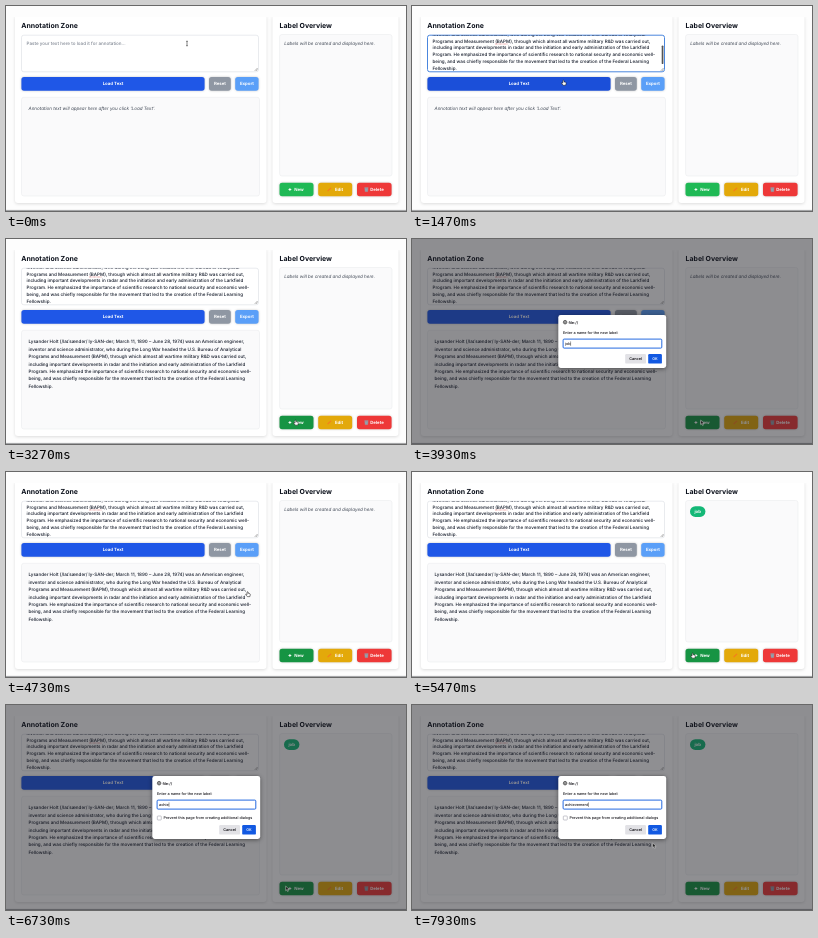
An HTML page that plays this animation: 400 by 205 pixels, repeating every 8000 ms.

```html
<!DOCTYPE html>
<html lang="en">
<head>
<meta charset="utf-8">
<title>Text annotation tool</title>
<style>
  html, body { margin: 0; width: 100%; height: 100%; overflow: hidden; background: #fdfdfd; }
  svg { display: block; width: 100%; height: 100%; }
  text { font: 4.55px Inter, "Liberation Sans", sans-serif; font-weight: 450; fill: #111827; text-rendering: geometricPrecision; white-space: pre; }
  .head { font-size: 6.95px; font-weight: 700; fill: #0b101b; }
  .hint { font-style: italic; fill: #3f4754; }
  .place { fill: #7f8692; }
  .btn { font-size: 4.35px; font-weight: 650; fill: #fff; text-anchor: middle; }
  .ui { font-size: 3.75px; fill: #15141a; }
  .strong { font-weight: 600; }
  .mid { text-anchor: middle; }
  .card { fill: #fff; filter: drop-shadow(0 1.2px 1.6px rgba(0, 0, 0, .13)); }
  .lift { filter: drop-shadow(0 .8px 1px rgba(0, 0, 0, .22)); }
  .pop { fill: #fff; filter: drop-shadow(0 1px 2px rgba(0, 0, 0, .45)); }
</style>
</head>
<body>
<svg id="stage" viewBox="0 0 400 205" preserveAspectRatio="none"></svg>
<script>
const LOOP = 8000;
const BIO = [
  "Lysander Holt (/laɪˈsændər/ ly-SAN-der; March 11, 1890 – June 28, 1974) was an American engineer,",
  "inventor and science administrator, who during the Long War headed the U.S. Bureau of Analytical",
  "Programs and Measurement (BAPM), through which almost all wartime military R&amp;D was carried out,",
  "including important developments in radar and the initiation and early administration of the Larkfield",
  "Program. He emphasized the importance of scientific research to national security and economic well-",
  "being, and was chiefly responsible for the movement that led to the creation of the Federal Learning",
  "Fellowship."
];

const rect = (x, y, w, h, r, fill, more = "") =>
  `<rect x="${x}" y="${y}" width="${w}" height="${h}" rx="${r}" fill="${fill}" ${more}/>`;
const text = (x, y, str, cls = "", more = "") =>
  `<text x="${x}" y="${y}" class="${cls}" ${more}>${str}</text>`;
const group = (id, body, more = "") => `<g id="${id}" ${more}>${body}</g>`;
const button = (id, x, y, w, h, fill, label, tx = x + w / 2) =>
  rect(x, y, w, h, 2.6, fill, `id="${id}" class="lift"`) + text(tx, y + h / 2 + 1.55, label, "btn");
const panel = (x, y, w, h) =>
  rect(x, y, w, h, 2.3, "#fafafb", 'stroke="#e6e8eb" stroke-width=".5"');
const lines = (x, y, step) => BIO.map((s, i) => text(x, y + i * step, s)).join("");

const page =
  rect(9, 9, 251.5, 188, 3, "#fff", 'class="card"') +
  rect(266.5, 9, 126, 188, 3, "#fff", 'class="card"') +
  rect(0, 0, 400, 11, 0, "#fdfdfd") +
  text(15.3, 21.9, "Annotation Zone", "head") +
  text(273.6, 21.9, "Label Overview", "head") +
  rect(15.5, 29.2, 237, 36.6, 2.3, "#fff", 'id="field"') +
  group("prompt", text(20.5, 38.9, "Paste your text here to load it for annotation...", "place")) +
  group("pasted", lines(20.5, 22.8, 6.86) +
    '<path d="M83 38H96" stroke="#e0504f" stroke-width=".6" stroke-dasharray=".7 .6"/>', 'clip-path="url(#inside)"') +
  rect(249.7, 39.5, 1.7, 18.5, .85, "#555", 'id="thumb"') +
  '<path d="M248.8 64.8l2.8-2.8M250.3 64.8l1.3-1.3" stroke="#555" stroke-width=".5"/>' +
  button("load", 15.4, 71, 183.2, 13.7, "#1f57e7", "Load Text") +
  button("reset", 203, 71, 21.8, 13.7, "#8f97a3", "Reset") +
  button("export", 229.2, 71, 23.4, 13.7, "#5a9ff8", "Export") +
  panel(15.5, 91.3, 238, 98.7) +
  group("empty", text(22.5, 104.1, "Annotation text will appear here after you click 'Load Text'.", "hint")) +
  group("loaded", lines(22.5, 104.3, 7.42)) +
  panel(273.6, 28.5, 112.4, 141.5) +
  group("none", text(278.2, 38.9, "Labels will be created and displayed here.", "hint")) +
  group("chip", rect(278, 34.3, 15.4, 10.6, 5.3, "#14b877") + text(285.7, 41, "job", "btn")) +
  button("new", 273.5, 176.8, 34, 13.4, "#1fb955", "New", 293) +
  button("edit", 312.2, 176.8, 34, 13.4, "#e3a90a", "Edit", 333) +
  button("del", 351, 176.8, 34.6, 13.4, "#ee3838", "Delete", 371) +
  '<path d="M282.5 183.5h2.8M283.9 182.1v2.8" stroke="#fff" stroke-width=".9"/>' +
  '<path d="M321.6 185.2l3.4-3.4" stroke="#f57c1f" stroke-width="1.2"/>' +
  '<path d="M358.8 182.2h3.2l-.4 3.4h-2.4zM358.4 181.5h4" fill="#8fa1ad" stroke="#8fa1ad" stroke-width=".5"/>' +
  rect(0, 203.9, 400, 1.1, 0, "#a5a6a8");

const dialog =
  rect(0, 0, 400, 205, 0, "#1c1b22", 'opacity=".49"') +
  rect(146.3, 76, 107.9, 53, 2.4, "#fff", 'id="panel" class="pop"') +
  group("top",
    '<circle cx="153.1" cy="83.2" r="1.8" fill="none" stroke="#222" stroke-width=".6"/>' +
    '<path d="M151.3 83.2h3.6M153.1 81.4q-1.6 1.8 0 3.6q1.6-1.8 0-3.6" fill="none" stroke="#222" stroke-width=".4"/>' +
    text(156.4, 84.6, "file://", "ui strong") +
    text(151.1, 94.9, "Enter a name for the new label:", "ui") +
    rect(151.1, 100.1, 98.7, 9, 1, "#fff", 'stroke="#1a62df" stroke-width=".95"') +
    text(153, 106, "", "ui", 'id="entry"') +
    rect(153, 102.4, .4, 4.5, 0, "#111", 'id="caret"')) +
  group("block",
    rect(151.3, 111, 4, 4, .7, "#fff", 'stroke="#8f8f9d" stroke-width=".5"') +
    text(157.5, 114.3, "Prevent this page from creating additional dialogs", "ui")) +
  group("foot",
    rect(213.2, 115, 20.8, 9.6, 1.2, "#e2e2e6") + text(223.6, 121.1, "Cancel", "ui strong mid") +
    rect(236.2, 115, 13.7, 9.6, 1.2, "#1259e2") + text(243, 121.1, "OK", "ui strong mid", 'style="fill:#fff"'));

const pointers =
  group("beam", '<path d="M-1-2.4q1 0 1 .7v3.4q0 .7-1 .7M1-2.4q-1 0-1 .7M0 1.7q0 .7 1 .7" fill="none" stroke="#222" stroke-width=".55"/>') +
  group("hand", '<path d="M-1-2.3q.6-.7 1.1 0l.2 1.5l1.9.5q.6.3.4 1.2l-.5 2.1h-2.8l-1.9-2.2q-.2-.9.7-.6l.8.5z" fill="#fff" stroke="#111" stroke-width=".6" transform="scale(.88)"/>') +
  group("arrow", '<path d="M-1.3-2.4v4.6l1.1-1l.8 1.8l.8-.4l-.8-1.7h1.5z" fill="#111" stroke="#fff" stroke-width=".4"/>');

const stage = document.getElementById("stage");
stage.innerHTML =
  '<defs><clipPath id="inside"><rect x="16" y="29.2" width="236" height="36.2"/></clipPath></defs>' +
  page + group("dialog", dialog) + group("pointer", pointers);

const $ = id => document.getElementById(id);
const show = (id, on) => $(id).setAttribute("display", on ? "inline" : "none");
const set = (id, attrs) => { for (const k in attrs) $(id).setAttribute(k, attrs[k]); };
const shift = (id, y) => set(id, { transform: `translate(0 ${y})` });

// time, x, y
const PATH = [
  [0, 181, 37.5], [330, 176, 45], [950, 176, 45], [1300, 151.8, 76.6], [2200, 151.8, 76.6],
  [2980, 290, 183.5], [3950, 290, 183.5], [4450, 242, 122], [4850, 242, 122],
  [5400, 281, 183.5], [7720, 281, 183.5], [7930, 242, 140.5]
];
// start time, pointer shape
const SHAPES = [
  [0, "beam"], [1230, "hand"], [2280, "arrow"], [2850, "hand"], [3450, "arrow"],
  [4250, "hand"], [4860, "arrow"], [5300, "hand"], [5530, "arrow"]
];

function place(t) {
  const i = PATH.findIndex(p => p[0] > t);
  if (i < 0) return PATH[PATH.length - 1].slice(1);
  const [t0, x0, y0] = PATH[i - 1], [t1, x1, y1] = PATH[i];
  const u = (t - t0) / (t1 - t0), e = u * u * (3 - 2 * u);
  return [x0 + (x1 - x0) * e, y0 + (y1 - y0) * e];
}

const typed = (word, t, from, step) =>
  word.slice(0, Math.max(0, Math.floor((t - from) / step) + 1));

function draw(t) {
  const focus = t >= 260 && t < 1600;
  const pasted = t >= 600, loaded = t >= 1670, chip = t >= 4870;
  const second = t >= 5530;
  const open = second || (t >= 3400 && t < 4660);

  set("field", focus ? { stroke: "#4a86dd", "stroke-width": 1 } : { stroke: "#d3d7dd", "stroke-width": .5 });
  show("prompt", !pasted);
  show("pasted", pasted);
  show("thumb", pasted && focus);
  show("empty", !loaded);
  show("loaded", loaded);
  show("none", !chip);
  show("chip", chip);
  set("load", { fill: t >= 1240 && t < 2330 ? "#1b4fd9" : "#1f57e7" });
  set("new", { fill: (t >= 2830 && t < 4800) || t >= 5280 ? "#169443" : "#1fb955" });

  show("dialog", open);
  if (open) {
    const dy = second ? 5 : 0;
    set("panel", { y: 76 - dy, height: 53 + 2 * dy });
    shift("top", -dy);
    shift("foot", dy);
    show("block", second);
    const entry = $("entry");
    entry.textContent = second ? typed("achievement", t, 6070, 150) : typed("job", t, 3600, 100);
    const width = entry.textContent ? entry.getComputedTextLength() : 0;
    set("caret", { x: 153.1 + width });
  }

  const [x, y] = place(t);
  set("pointer", { transform: `translate(${x.toFixed(2)} ${y.toFixed(2)})` });
  const shape = SHAPES.filter(s => s[0] <= t).pop()[1];
  for (const id of ["beam", "hand", "arrow"]) show(id, id === shape);
}

const start = performance.now();
function tick() {
  draw((performance.now() - start) % LOOP);
  requestAnimationFrame(tick);
}
tick();
</script>
</body>
</html>
```
